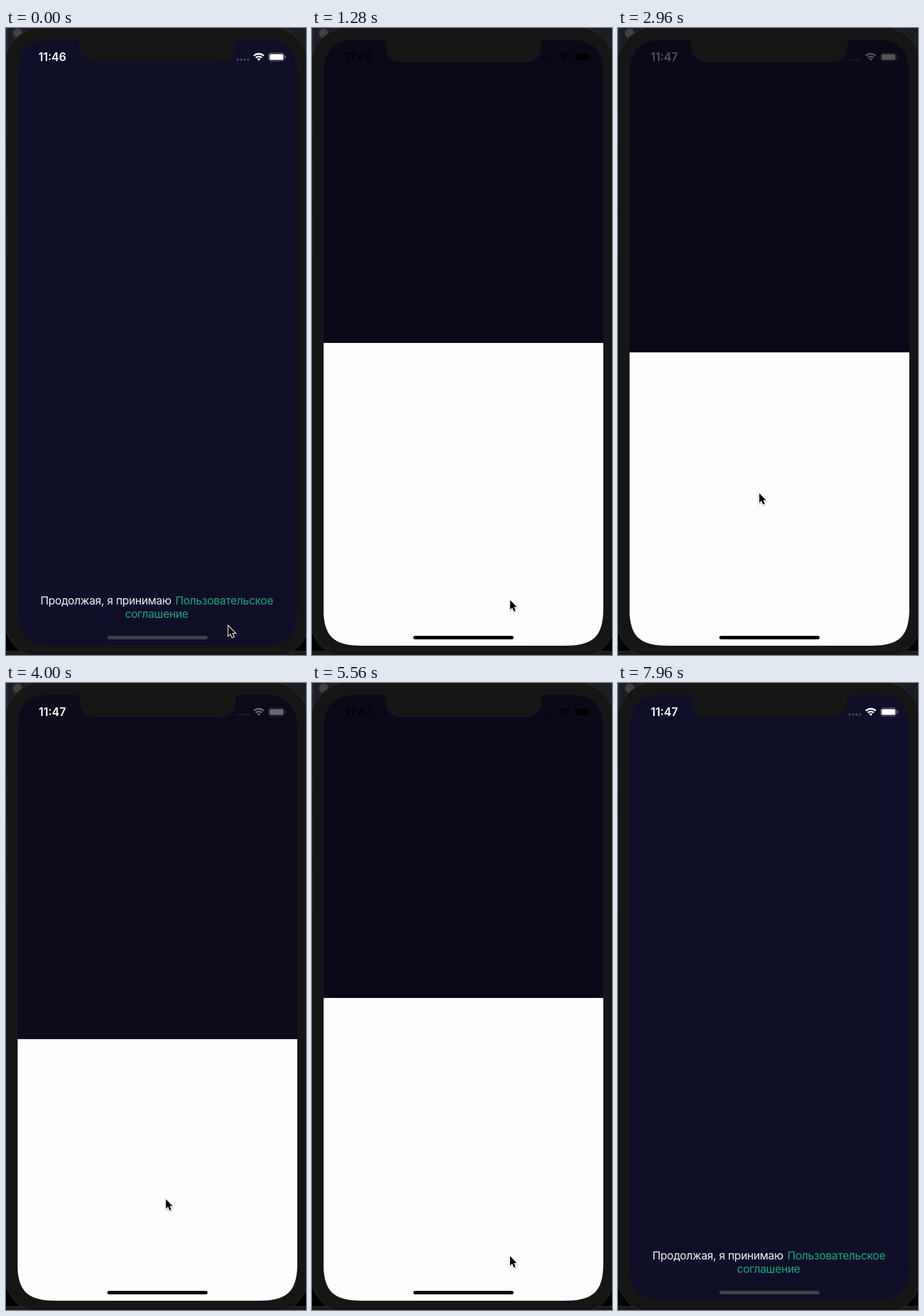
An HTML page that plays this animation: 518x1081 px, repeating every 8.72 s.

```html
<!DOCTYPE html>
<html lang="ru">
<head>
<meta charset="utf-8">
<title>Bottom sheet</title>
<style>
@property --y { syntax: "<number>"; inherits: true; initial-value: 1066; }

html, body { margin: 0; width: 100%; height: 100%; overflow: hidden; background: #000; }
#stage { position: relative; width: 518px; height: 1081px; overflow: hidden; }
svg { position: absolute; left: 0; top: 0; overflow: visible; }
text { font-family: Inter, "Open Sans", sans-serif; }

#screen {
  position: absolute; left: 19.6px; top: 19.6px; width: 483.6px; height: 1045.4px; background: #100f29;
  clip-path: path("M68 0H415.6C467.6 0 483.6 16 483.6 68V977.4C483.6 1029.4 467.6 1045.4 415.6 1045.4H68C16 1045.4 0 1029.4 0 977.4V68C0 16 16 0 68 0Z");
  animation: sheet 8720ms linear infinite;
}
#dim, #sheet { position: absolute; inset: 0; }
#dim { background: #040000; opacity: calc((1066 - var(--y)) / 523 * .4); }
#sheet { background: #fffdff; clip-path: inset(calc((var(--y) - 19.6) * 1px) 0 0 0); }
.bar { position: absolute; left: 155.8px; top: 1028.4px; width: 172.4px; height: 6.4px; border-radius: 3.2px; background: #434045; }
#sheet .bar { background: #000; }

.terms { font-size: 19px; letter-spacing: -.28px; fill: #f3f2f6; }
.link { fill: #14aa7d; }

.time { font-size: 19.5px; font-weight: 600; text-anchor: middle; }
#clock { fill: currentColor; animation: clock 8720ms linear infinite; }
#icons { fill: currentColor; animation: icons 8720ms linear infinite; }
#before { animation: before 8720ms step-end infinite; }
#after { animation: after 8720ms step-end infinite; }
#cursor { width: 18px; height: 26px; filter: drop-shadow(0 1.5px 1px #0005); animation: cursor 8720ms ease-in-out infinite; }

@keyframes sheet {
  0% { --y: 1066; }
  9.656% { --y: 1066; animation-timing-function: cubic-bezier(.333, .88, .667, 1); }
  12.844%, 26.62% { --y: 543; animation-timing-function: ease-in-out; }
  31.193% { --y: 651; }
  33.028% { --y: 651; animation-timing-function: ease-out; }
  34.404%, 44.495% { --y: 543; }
  45.885% { --y: 614; animation-timing-function: cubic-bezier(.25, .35, .5, 1); }
  49.541% { --y: 1066; }
  60.62% { --y: 1066; animation-timing-function: cubic-bezier(.333, .88, .667, 1); }
  63.761%, 72.706% { --y: 543; }
  74.785% { --y: 635.6; animation-timing-function: cubic-bezier(.25, .35, .5, 1); }
  78.44%, 100% { --y: 1066; }
}
@keyframes cursor {
  0% { transform: translate(383px, 1030px); }
  5.046%, 14.22% { transform: translate(342px, 988px); }
  21.101%, 23.853% { transform: translate(240px, 676px); }
  26.606% { transform: translate(240px, 684px); }
  31.193%, 35.78% { transform: translate(243px, 801px); }
  38.991% { transform: translate(240px, 553px); }
  42.202% { transform: translate(250px, 801px); }
  44.037% { transform: translate(250px, 801px); animation-timing-function: linear; }
  45.872% { transform: translate(275px, 888px); animation-timing-function: ease-out; }
  47.706%, 50.459% { transform: translate(285px, 960px); }
  57.339%, 63.761% { transform: translate(341px, 987px); }
  69.266% { transform: translate(345px, 724px); }
  72.018% { transform: translate(345px, 724px); animation-timing-function: linear; }
  74.771% { transform: translate(349px, 831px); animation-timing-function: ease-out; }
  79.817% { transform: translate(423px, 1048px); }
  84.862% { transform: translate(423px, 1048px); animation-timing-function: linear; }
  86.697%, 100% { transform: translate(495px, 1090px); }
}
@keyframes clock {
  0%, 9.656%, 29.358%, 33.028%, 45.642%, 60.62%, 76.606%, 100% { color: #fff; }
  10.092%, 61.009% { color: #a0a0a4; }
  11.009%, 26.835%, 34.404%, 44.495%, 61.927%, 73.853% { color: #000; }
  74.771% { color: #34323c; }
}
@keyframes icons {
  0%, 9.656%, 29.358%, 33.028%, 47.248%, 60.62%, 76.606%, 100% { color: #fff; }
  10.092%, 61.009% { color: #a0a0a4; }
  11.009%, 26.835%, 34.404%, 44.495%, 61.927%, 73.853% { color: #000; }
  45.872% { color: #67666e; }
  74.771% { color: #3a3842; }
}
@keyframes before { 0% { opacity: 1; } 17.431%, 100% { opacity: 0; } }
@keyframes after { 0% { opacity: 0; } 17.431%, 100% { opacity: 1; } }
</style>
</head>
<body>
<div id="stage">
  <!-- desktop and phone body -->
  <svg width="518" height="1081">
    <rect width="518" height="1081"/>
    <rect width="518" height="60" fill="#1d1e22"/>
    <rect width="3" height="60" fill="#1d2a38"/>
    <rect y="1074" width="518" height="7" fill="#1b1b1d"/>
    <rect y="1074" width="518" height="1" fill="#2c2c2e"/>
    <circle cx="20" cy="9" r="8" fill="#414043"/>
    <rect x="-3.5" y="-3.5" width="528" height="1092" rx="72" fill="#171617" stroke="#343336"/>
    <path d="M1.5 155V190M1.5 232V304M1.5 322V391" stroke="#232225"/>
  </svg>

  <div id="screen">
    <svg width="484" height="1046">
      <g class="terms" transform="translate(-19.6 -19.6)">
        <text x="59" y="993.5">Продолжая, я принимаю</text>
        <text x="292" y="993.5" class="link">Пользовательское</text>
        <text x="205" y="1016.5" class="link">соглашение</text>
      </g>
    </svg>
    <div class="bar"></div>
    <div id="dim"></div>
    <div id="sheet"><div class="bar"></div></div>
  </div>

  <!-- notch and status bar -->
  <svg width="518" height="70">
    <path fill="#171617" d="M118 19V20Q127 20 127 28V30Q127 59 156 59H367Q396 59 396 30V28Q396 20 405 20V19Z"/>
    <g id="clock" class="time">
      <text id="before" x="80" y="57">11:46</text>
      <text id="after" x="80" y="57">11:47</text>
    </g>
    <g id="icons">
      <g opacity=".23">
        <circle cx="400" cy="54.5" r="2.1"/><circle cx="406" cy="54.5" r="2.1"/>
        <circle cx="412" cy="54.5" r="2.1"/><circle cx="418" cy="54.5" r="2.1"/>
      </g>
      <g transform="translate(436.5 56.5)">
        <path d="M0 0L-2.9-2.9A4.1 4.1 0 0 1 2.9-2.9Z"/>
        <path d="M-8.5-8.5A12 12 0 0 1 8.5-8.5M-5.2-5.2A7.4 7.4 0 0 1 5.2-5.2" fill="none" stroke="currentColor" stroke-width="2.9"/>
      </g>
      <rect x="453.2" y="43.2" width="27.6" height="13.6" rx="4.2" fill="none" stroke="currentColor" opacity=".45"/>
      <rect x="455" y="45" width="24" height="10" rx="2.6"/>
      <path d="M482 47.7Q483.8 48.4 483.8 50T482 52.3Z" opacity=".5"/>
    </g>
  </svg>

  <svg id="cursor">
    <path d="M1 1.2V17.4L4.7 14.1L7.5 20.5L10.3 19.3L7.6 13.1H12.5Z" stroke="#fff" stroke-width="2.4" paint-order="stroke"/>
  </svg>
</div>
</body>
</html>
```
